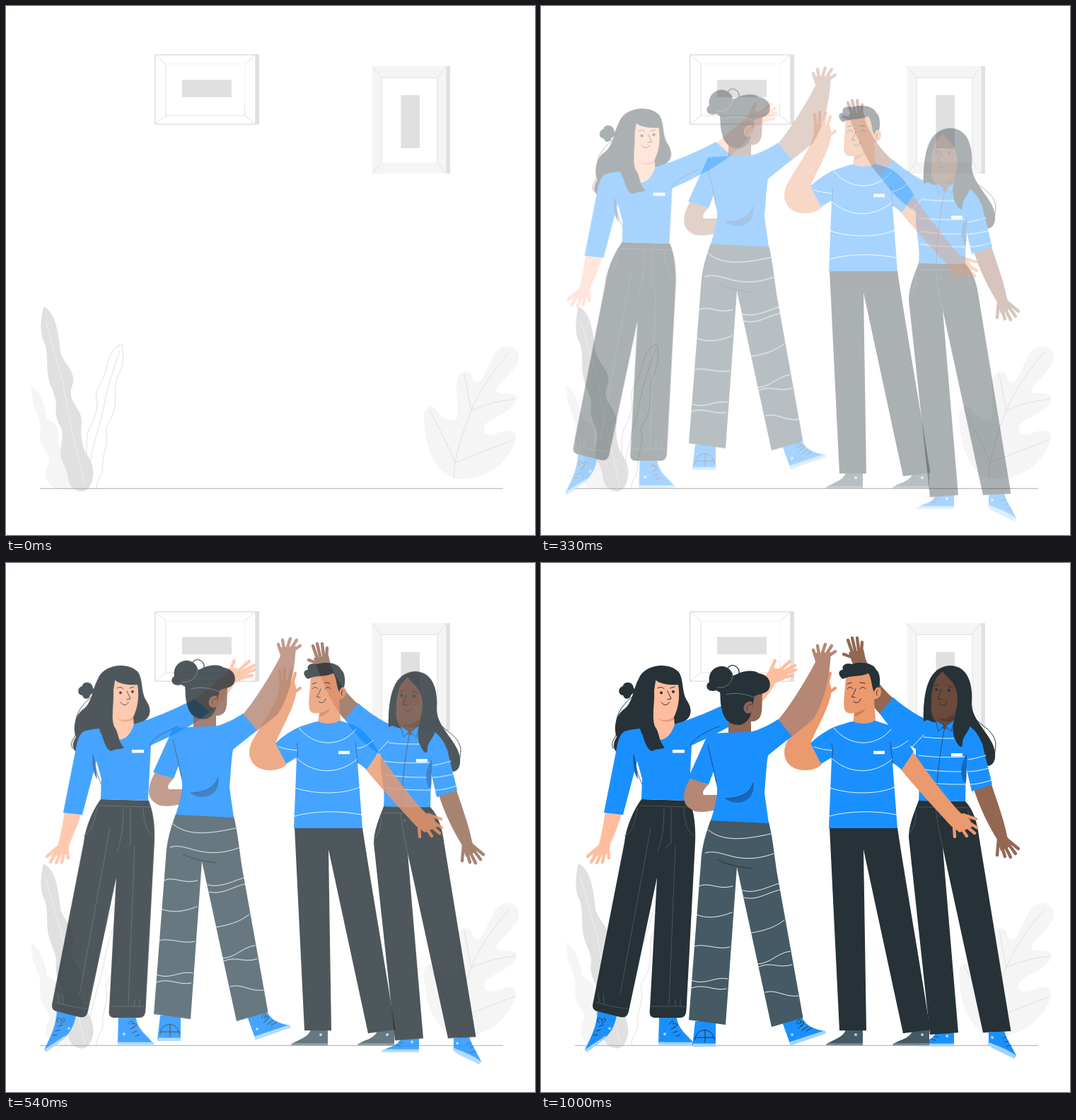
Animation of 748x748 px, one loop 1040 ms. Source, as an HTML page:

```html
<!DOCTYPE html>
<html lang="en">
<head>
<meta charset="utf-8">
<title>High five</title>
<style>
html, body { margin: 0; width: 100%; height: 100%; overflow: hidden; background: #fff; }
svg { display: block; width: 100%; height: 100%; }

/* Everyone arrives within 1000 ms of the 1040 ms loop, then rests. */
.person {
  animation: arrive 1040ms infinite;
  will-change: transform, opacity;
}
.left  { --x: -44.9px; --y: 0px; }
.right { --x: 0px; --y: 44.9px; }
.back  { --x: 0px; --y: -44.9px; }
.man   { --x: 0px; --y: 0px; }
@keyframes arrive {
  0% {
    opacity: 0;
    transform: translate(var(--x), var(--y));
    animation-timing-function: cubic-bezier(.36, -.01, .5, 1.38);
  }
  96.154%, 100% { opacity: 1; transform: translate(0, 0); }
}

.skin { fill: currentColor; }
.fingers { fill: none; stroke: currentColor; stroke-width: 4.4; stroke-linecap: round; stroke-linejoin: round; }
.blue { fill: #1a90ff; }
.shade { fill: #1568bd; }
.dark { fill: #263238; }
.slate { fill: #455a64; }
.sole { fill: #a3d3ff; }
.white { fill: #fff; }
.pale { fill: #f5f5f5; }
.grey { fill: #e0e0e0; }
.ink, .stripe, .seam, .vein { fill: none; stroke-linecap: round; stroke-linejoin: round; }
.ink { stroke: #263238; stroke-width: 1; }
.stripe { stroke: #fff; stroke-width: .9; }
.seam { stroke: #59646a; stroke-width: .7; }
.vein { stroke: #e0e0e0; stroke-width: 1; }
.thin { stroke-width: .7; }
</style>
</head>
<body>
<svg viewBox="0 0 748 748" xmlns="http://www.w3.org/2000/svg">

<!-- room -->
<g>
  <path class="vein" style="stroke-width:1.6" d="M210.700 69H353V167.300H210.700Z"/>
  <path class="grey" d="M353 68.300H358V167.500H353Z"/>
  <path class="vein" d="M226 82V155H337.500V138M211 69L226 82M353 69L338 82M211 167L226 155M353 167L338 155"/>
  <path class="vein" style="stroke:#f3f3f3" d="M226 82H338V138"/>
  <path class="grey" d="M249 104.500H319V129H249Z"/>

  <path class="pale" d="M517.500 85H623V237H517.500Z"/>
  <path class="grey" d="M622.500 85H628V237H622.500Z"/>
  <path class="white" d="M531 101.500H610V221H531Z"/>
  <path class="vein" d="M531 221V101.500H610V221M518 85.500L531 101.500M622 85.500L610 101.500M518 236.500L531 221M622 236.500L610 221"/>
  <path class="grey" d="M558.500 126H585V201H558.500Z"/>

  <path class="pale" d="M35 536C50 546 55 566 58 584C72 590 78 600 73 614C78 630 90 650 110 684L72 683C56 676 52 662 60 648C66 634 48 628 48 606C52 590 42 574 38 560Z"/>
  <path class="grey" d="M53 425C68 432 74 455 77 490C82 506 97 516 95 530C94 540 89 545 93 555C97 566 108 575 107 590C105 606 107 625 117 638C125 652 126 668 118 680C112 688 106 687 100 685C92 682 87 672 87 662C84 650 76 640 77 630C78 618 82 608 78 597C72 586 69 577 71 563C71 550 60 535 59 520C57 505 60 490 54 475C48 465 48 445 53 425Z"/>
  <path class="vein" style="stroke:#f0f0f0" d="M56 445C66 480 74 510 80 530C88 580 100 630 112 680"/>
  <path class="vein" d="M118 665C112 640 114 625 115 605C120 590 132 575 128 555C124 545 138 530 142 514C144 500 150 482 164 478C168 500 164 515 157 525C152 540 157 560 152 575C148 588 138 595 142 605C146 615 134 640 137 655C136 665 127 670 128 682M161 487C150 520 140 550 138 570C130 600 122 625 119 645"/>

  <path class="pale" d="M633 668C610 660 592 630 591 580C591 565 605 562 611 574C618 584 630 588 635 586C642 580 637 560 637 535C638 515 655 512 659 524C660 534 668 535 674 526C684 510 688 482 709 481C726 481 729 499 720 510C712 524 690 538 694 546C702 550 718 545 722 553C722 566 705 575 692 582C678 588 672 596 678 604C688 612 705 594 719 602C726 612 712 640 690 655C670 668 650 671 633 668Z"/>
  <path class="vein" d="M711 490C690 515 668 545 658 572C645 605 634 635 633 668M648 520C652 540 655 560 658 572C680 562 700 558 720 556M599 571C612 597 625 620 635 646C660 636 700 620 719 613"/>
  <path fill="none" stroke="#a8a8a8" stroke-width="1.100" d="M48 682.200H703"/>
</g>

<!-- woman on the left -->
<g class="person left" color="#ffbd9e">
  <path class="skin" d="M275 194L316 160L328 148L350 152L345 164L331 170C322 188 310 200 295 212Z"/>
  <path class="fingers" d="M322 158L331 138M335 154L352 139M338 156L359 145M338 159L360 151M336 163L356 159"/>
  <path class="skin" d="M91 352L114 355C108 375 102 388 98 397L95 411L72 415L81 400C86 385 88 368 91 352Z"/>
  <path class="fingers" d="M81 402L66 415M80 408L71 423M85 410L79 424M90 409L87 423M94 400L96 417"/>
  <path class="blue" d="M80 633L107 640C104 658 95 668 88 674L65 691L62 688C70 672 79 655 80 633ZM167 643L192 643C194 660 208 668 217 680H166Z"/>
  <path class="sole" d="M62 688L65 691L91 672L92 668ZM166 677.500L214 677.500L218 681.500H166Z"/>
  <path class="ink" d="M82 655L88 653M78 662L84 660M74 668L80 667M82 650C76 644 86 640 86 648C90 640 96 646 86 651M184 659L190 656M187 664L193 662M191 669L197 667M182 652C184 645 191 648 186 652C192 650 196 654 188 656"/>
  <path class="sole" d="M97 656a2 2 0 1 0 .1 0ZM175 664a2 2 0 1 0 .1 0Z"/>
  <path class="dark" d="M142 334L210 336C216 352 219 368 218 395L205.500 632C205 640 202 643 196 643H160C154 642 153 638 154 630L164 445L124 634C122 642 118 643 112 642L80 634C73 632 72 628 74 620L118 395C120 375 130 350 142 334Z"/>
  <path class="seam" d="M140 343L212 345M137 346C132 368 130 380 118 386M174 346C174 385 168 398 165 408M184 346V396L176 402M202 346C203 370 208 382 218 386M155 375L112 610M190 400L181 625M78 621C95 626 108 629 123 630M156 627H204M81 608L83 622M88 610L89 624M190 617V626M197 617V626"/>

  <path class="dark" d="M138 164C146 142 184 139 196 156C202 168 199 182 206 194C216 208 214 224 190 228L150 235C140 250 130 266 116 270C103 270 99 258 107 246C102 232 106 215 117 207C130 198 130 178 138 164Z"/>
  <path class="dark" d="M131 177C130 166 116 168 116 174C108 176 109 187 116 187C118 195 127 192 127 187L135 180Z"/>
  <path class="ink" d="M128 190C116 200 104 215 107 232C111 246 96 250 102 262"/>
  <path class="skin" d="M160 166C160 180 158 200 159 214L151 233C156 254 180 258 189 229L188 218C194 206 197 190 194 172C180 172 170 170 165 162Z"/>
  <path fill="#eb9b7c" d="M165 219C172 224 184 222 188 217L188 221C181 227 170 225 165 219Z"/>
  <path class="blue" d="M118 238C130 234 142 234 152 234C156 254 180 258 189 228C215 220 245 208 275 192L296 211C270 232 240 245 213 258L209 336L142 334L143 305L136 280L116 356L89 353L107 262C109 250 112 242 118 238Z"/>
  <path class="shade" d="M131 271C129 285 131 296 137 306C136 295 135 283 131 271Z"/>
  <path class="ink thin" d="M131 271C133 286 137 300 143 313M211 258C218 246 232 239 252 231"/>
  <path class="white" d="M186 264H203V268.500H186Z"/>
  <path class="dark" d="M157 160C164 172 182 173 196 172C193 148 166 144 157 160Z"/>
  <path class="dark" d="M163 161C152 156 147 175 146 195C142 210 134 226 144 244C148 258 152 265 157 266C164 262 170 264 175 261C166 252 168 240 161 231C156 218 161 200 160 180Z"/>
  <path class="ink" d="M165 177C168 175 172 175 174 178M183 177L189 175M179 181C181 186 183 189 184 192L179 193M170 197C174 202 179 202 181 197"/>
  <path class="dark" d="M170 181.500a2 2 0 1 0 .1 0ZM187 180a2 2 0 1 0 .1 0Z"/>
</g>

<!-- woman on the right -->
<g class="person right" color="#946753">
  <path class="skin" d="M439 138L435 126L456 122L459 136C467 157 482 178 499 192L480 214C463 198 450 165 439 138Z"/>
  <path class="fingers" d="M442 134L428 129M440 126L434 109M444 123L440 106M449 122L447 106M453 126L454 112"/>
  <path class="skin" d="M612 320L637 313C646 340 656 368 659 386L665 400L650 407L645 391C632 370 620 345 612 320Z"/>
  <path class="fingers" d="M647 390L645 413M652 402L656 415M656 400L664 416M660 396L671 411M658 390L675 404"/>
  <path class="blue" d="M558 665L584 663V683H531C540 675 553 676 558 665ZM633 664L655 661C657 672 666 683 672 697L668 700C655 692 640 688 633 680Z"/>
  <path class="sole" d="M534 679.500H584V683.500H530ZM632 677C645 683 660 687 672 697L669 701C655 693 640 689 632 681Z"/>
  <path class="sole" d="M574 667a2 2 0 1 0 .1 0ZM638 669a2 2 0 1 0 .1 0Z"/>
  <path class="ink thin" d="M555 669L562 671M551 673L558 675M652 672L658 670M655 678L661 676M658 684L664 682"/>
  <path class="dark" d="M534 336L600 337C612 350 617 368 619 385L664.500 662L625 664L568 402L590 664L550 667L520 388C520 370 528 352 534 336Z"/>
  <path class="seam" d="M534 345L604 346M558 346C560 365 564 385 568 402M530 350C532 366 526 376 521 382M604 350C606 366 612 374 618 378M564 354a2 2 0 1 0 .1 0"/>
  <path class="dark" d="M541 224C540 180 548 146 579 145C606 146 611 175 609 200C610 225 640 245 642 268C643 280 639 286 632 287C622 268 612 240 590 226L560 226Z"/>
  <path class="ink" d="M606 212C620 230 640 235 643 255C643 262 641 270 641 276"/>
  <path class="blue" d="M498 190C516 206 538 220 558 226L586 223C606 227 616 236 624 256L638 313L609 323L601 288L600 337L534 336C536 315 532 300 530 280L530 263C512 253 495 236 479 213Z"/>
  <path fill="#6b493b" d="M553 168C550 195 550 208 554 217L558 226L571 236L584 226L587 212L593 185C588 170 574 163 568 153Z"/>
  <path fill="#593c30" d="M560 219C569 222 580 219 585 211L584 222C576 226 566 225 560 219Z"/>
  <path class="ink thin" style="fill:#1a90ff" d="M558 222L562 238L570 230ZM585 221L580 238L572 231Z"/>
  <path class="stripe" d="M541 246C555 248 570 248 584 248M534 272C555 275 580 275 599 274M537 291C558 295 582 295 600 295M537 309C560 313 582 313 600 313M604 278C612 277 622 274 629 272M604 295C614 295 626 292 634 290M607 313C616 313 628 310 637 307M541 243L525 260"/>
  <path class="ink thin" d="M570 236C564 270 560 300 559 336M601 271V305"/>
  <path class="shade" d="M602 271C594 280 592 296 597 308L601 311Z"/>
  <path class="white" d="M580 269H596V273.500H580Z"/>
  <path class="dark" d="M568 150C580 165 590 176 589 195C586 220 578 235 586 250C590 260 596 264 596 255C596 240 613 240 609 200C606 165 590 148 568 150Z"/>
  <path class="dark" d="M572 149C560 155 553 172 552 192L551 220L541 224C540 185 550 150 572 149Z"/>
  <path class="ink" d="M556 174L562 172M575 173L582 176M566 178C565 184 562 188 561 192L567 193M564 199C568 203 572 201 574 197"/>
  <path class="dark" d="M559 177a2 2 0 1 0 .1 0ZM577 178a2 2 0 1 0 .1 0Z"/>
</g>

<!-- man -->
<g class="person man" color="#eb996e">
  <path class="skin" d="M381 255L397 285C388 294 365 297 352 286C340 275 343 258 352 245C365 222 379 205 385 184L387 166L408 168L411 180C408 205 391 230 381 255Z"/>
  <path class="fingers" d="M389 172L387 153M394 168L394 150M400 168L403 151M405 170L409 156M406 184L416 177"/>
  <path class="skin" d="M508 291L527 268C545 295 575 335 594 354L606 362L610 373L592 381L580 372C560 350 530 318 508 291Z"/>
  <path class="fingers" d="M597 356L615 362M602 365L616 374M600 371L613 382M594 374L602 386M584 372L585 387"/>
  <path class="slate" d="M431 659H455V681H403C411 674 428 672 431 659ZM525 662L549 659V681H497C505 674 520 674 525 662Z"/>
  <path fill="#788790" d="M405 679H455V682H403ZM499 679H549V682H497Z"/>
  <path class="sole" d="M445 665a2 2 0 1 0 .1 0ZM539 665a2 2 0 1 0 .1 0Z"/>
  <path class="dark" d="M408 374H504C512 430 540 590 550.500 660L512 665L456 405L460 661H422Z"/>
  <path class="skin" d="M431 160C430 180 427 198 429 206C431 213 437 213 443 212L441 226C450 230 466 229 473 223L471 193C479 192 483 185 480 178C477 174 473 176 470 181L464 152Z"/>
  <path fill="#cf7d54" d="M443 212C450 211 456 208 459 205C456 212 450 216 443 217Z"/>
  <path class="dark" d="M427 164C419 159 420 151 427 151C424 143 434 141 440 143C452 139 470 141 474 151C480 156 480 168 478 176C474 174 473 178 471 182C467 174 468 164 463 156C450 162 438 158 427 164Z"/>
  <path class="blue" d="M441 224C431 226 420 230 412 233C398 240 388 248 381 255L396 284L411 275L407 375H504L497 282L510 292L527 267C515 245 500 230 485 227C478 225 474 223 471 223C465 228 450 228 441 224Z"/>
  <path class="stripe" d="M414 233C436 261 474 261 495 235M386 260C394 263 403 264 411 265M411 276C436 300 472 299 497 277M409 318C435 327 475 328 500 317M408 358C435 350 475 350 503 356M497 262C505 262 514 255 519 251"/>
  <path class="ink thin" d="M411 255C413 263 413 270 411 277M494 254C495 264 496 275 498 284"/>
  <path class="white" d="M470 265.700H486V270.200H470Z"/>
  <path class="ink" d="M433 178C435 175 439 175 441 178M451 178C453 175 457 175 459 178M433 171L439 169M451 169L458 170M445 178C443 184 441 187 439 189L444 190M442 196C446 199 450 198 452 192M476 180C474 182 474 185 475 187"/>
</g>

<!-- woman seen from behind -->
<g class="person back" color="#b58774">
  <path class="skin" d="M211 304L237 313C232 318 227 323 230 328H251L249 349C235 352 218 354 212 348C199 341 199 325 211 304Z"/>
  <path class="skin" d="M335 222C352 203 375 165 388 140L389 127L410 126L409 139C407 168 398 202 384 222L354 246Z"/>
  <path class="fingers" d="M390 138L385 123M393 129L391 117M398 127L402 115M404 128L411 117M406 132L416 125"/>
  <path class="blue" d="M218 648H247L247 683H214ZM341 649L368 640C374 655 386 659 402 662V665L353 682Z"/>
  <path class="sole" d="M215 679.500H247V684H214ZM351 677.500L401 661L403 665L353 682.500Z"/>
  <path class="ink" d="M218 674C218 657 243 655 245 674M232 660V678M219 671H245M364 658L371 652M369 661L377 655M375 662L383 657M362 652C362 642 371 645 365 652C372 645 374 652 367 655"/>
  <path class="sole" d="M355 665a2 2 0 1 0 .1 0Z"/>
  <path class="slate" d="M240 363L322 366C328 390 330 415 334 440L370.500 643L326 656L277 430L261 653L209 646L226 425C227 400 234 380 240 363Z"/>
  <path class="stripe" d="M236 377C258 396 292 390 325 383M232 410C256 402 276 430 329 411M223 457C238 450 250 463 271 457M219 497C234 503 250 502 270 494M216 542C232 537 250 548 267 543M213 590C232 598 245 584 264 588M212 601C232 594 245 606 262 602M285 463C303 468 320 458 337 453M287 473C305 478 320 466 338 462M297 523C315 520 330 516 344 505M306 567C326 566 332 552 352 549M308 571C326 563 335 574 355 568M317 607C333 602 346 615 364 612"/>
  <path class="ink" d="M250 420C265 427 280 430 297 432"/>
  <path fill="#8f6556" d="M298 184L313 183C312 200 314 214 308 220C304 224 300 224 297 224V243H265V212Z"/>
  <path class="blue" d="M236 242C255 239 290 240 300 238C312 234 325 228 335 221L355 245C343 254 330 265 321 272C318 290 318 305 316 325L322 368L240 364C246 345 250 330 249 318L244 295L237 313L208 304Z"/>
  <path class="shade" d="M261 333C280 333 296 326 300 311C302 324 297 333 287 337C277 341 266 338 261 333Z"/>
  <path class="ink thin" d="M236 258C240 275 244 290 248 310M261 333C280 333 296 326 300 311"/>
  <path class="dark" d="M253 182C252 170 262 162 275 158C285 152 300 150 308 156C322 158 327 170 322 179C316 187 306 184 302 189L298 204C298 216 292 228 280 229C266 229 258 220 256 208C253 198 254 190 253 182Z"/>
  <path class="dark" d="M248 180C236 184 230 174 238 168C236 156 244 146 256 146C268 147 275 158 270 168C268 180 258 188 248 180Z"/>
  <path class="ink" d="M264 149C270 140 281 147 280 156C280 160 277 164 272 166" style="stroke-width:1.300"/>
  <path class="stripe" style="stroke-width:.7;opacity:.45" d="M249 176C262 178 271 169 271 158M262 186C278 182 290 186 302 190"/>
  <path fill="#8f6556" d="M298 196C290 194 285 202 287 208C289 214 296 214 299 209Z"/>
  <path class="ink thin" d="M297 200C292 200 290 204 292 208"/>
</g>
</svg>
</body>
</html>
```
